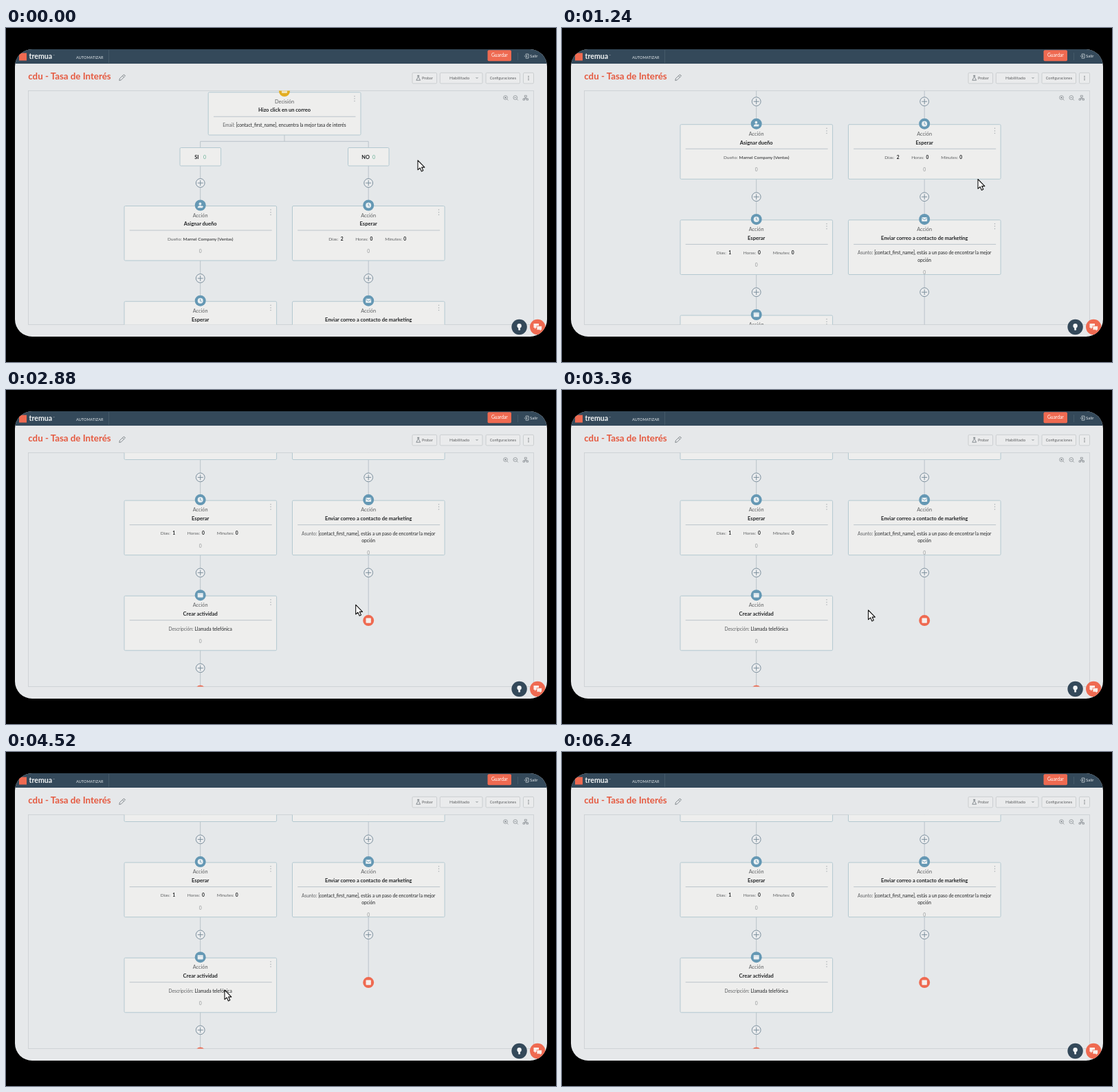
Animation, 800 px wide and 487 px high, one loop 6480 ms. Source, as an HTML page:

```html
<!DOCTYPE html>
<html lang="es">
<head>
<meta charset="utf-8">
<title>Automatizar</title>
<style>
  html, body { margin: 0; width: 100%; height: 100%; overflow: hidden; background: #000; }
  svg { display: block; width: 800px; height: 487px; }
  text { font: 6.65px Lato, sans-serif; fill: #5f6163; white-space: pre; }
  .b { font-weight: 700; }
  .dark { fill: #202224; }
  .line { fill: none; stroke: #b6c0c7; stroke-width: .9; }
  .card { fill: #eeeeed; stroke: #b3c8d0; }
  .icon { fill: none; stroke: #6d7479; stroke-width: .8; }
  .btn { fill: #eaebec; stroke: #c3c7ca; stroke-width: .8; }
  .light { fill: #e9eff2; }
  .mid { text-anchor: middle; }
</style>
</head>
<body>
<svg id="stage" viewBox="0 0 800 487"></svg>
<script>
const LEFT = 282.7, RIGHT = 527.2, LOOP = 6480, STEP = 40;
const BLUE = '#6598b4', RED = '#ef6a51', NAVY = '#34495a';

const text = (x, y, s, size = 6.65, cls = '', fill = '') =>
  `<text x="${x}" y="${y}" class="${cls}" style="font-size:${size}px;${fill && 'fill:' + fill}">${s}</text>`;
const mid = (x, y, s, size, cls = '', fill) => text(x, y, s, size, 'mid ' + cls, fill);
const rect = (x, y, w, h, attrs, r = 1.5) =>
  `<rect x="${x}" y="${y}" width="${w}" height="${h}" rx="${r}" ${attrs}/>`;
const path = (d, attrs = 'class="line"') => `<path d="${d}" ${attrs}/>`;
const circle = (x, y, r, attrs) => `<circle cx="${x}" cy="${y}" r="${r}" ${attrs}/>`;
const at = (x, y, s) => `<g transform="translate(${x} ${y})">${s}</g>`;
const dots = (x, y, gap = 3.6, fill = '#a7adb1') =>
  [-1, 0, 1].map(i => circle(x, y + i * gap, .75, `fill="${fill}"`)).join('');
const pair = (label, value) => `${label} <tspan class="dark">${value}</tspan>`;

const glyphs = {
  person: circle(-.3, -2, 1.9, 'class="light"') + path('M-4 3.8Q-3.8 .6-.3 .6T3.2 3.8Z', 'class="light"') +
    path('M1.3 2H4.4M2.8 .5V3.5', 'stroke="#e9eff2" stroke-width=".8"'),
  clock: circle(0, 0, 4, 'class="light"') + path('M0-2.5V.3L1.8 1.4', `fill="none" stroke="${BLUE}" stroke-width=".9"`),
  mail: rect(-4, -3, 8, 6, 'class="light"', .8) + path('M-4-2.2L0 .8 4-2.2', `fill="none" stroke="${BLUE}" stroke-width=".8"`),
  task: rect(-4, -3.2, 8, 6.4, 'class="light"', .8) + path('M-4-1.8H4', 'stroke="#b9d0dc" stroke-width=".7"'),
  stop: rect(-3.7, -3.7, 7.4, 7.4, 'fill="#f5efed"', 1)
};
const badge = (x, y, kind, fill = BLUE) => at(x, y, circle(0, 0, 8, `fill="${fill}"`) + glyphs[kind]);
const plus = (x, y) => at(x, y, circle(0, 0, 6.4, 'fill="#eaecee" stroke="#7b8e9c"') +
  path('M-4 0H4M0-4V4', 'stroke="#7b8e9c" fill="none"'));

// y is the centre of the badge on the card's top edge
function action(x, y, kind, title, body, zero = 69.5) {
  return rect(x - 110.7, y + 1, 221.6, 79.6, 'class="card"') +
    path(`M${x - 103} ${y + 36.5}h207`) + badge(x, y, kind) + dots(x + 102.3, y + 10.2) +
    mid(x, y + 17, 'Acción', 7.4) + mid(x, y + 29.9, title, 7.5, 'b dark') + body +
    mid(x, y + zero, '0', 6.8, '', '#96999b');
}
const wait = (x, y, days) => [[-58, 'Días:', -40.5, days], [-19, 'Horas:', 2.3, 0], [24, 'Minutes:', 51, 0]]
  .map(([a, label, b, n]) => text(x + a, y + 51.4, label, 6.5) + text(x + b, y + 51.4, n, 6.7, 'b dark')).join('');
const answer = (x, word, gap) => rect(x - 29.7, 174.5, 59.6, 26.5, 'class="card"') +
  text(x - gap, 190.6, word, 7.4, 'b dark') + text(x + gap - 4.2, 190.6, '0', 7, '', '#68b096');

const flow =
  path(`M405 156V165.3M${LEFT} 174V165.3H${RIGHT}V174M${LEFT} 201V676M${RIGHT} 201V574`) +
  rect(294.2, 93.8, 221.8, 62.2, 'class="card"') + path('M302 129.2H508.5') + dots(507, 103) +
  circle(405, 92, 8, 'fill="#e3ad22"') + rect(401, 89, 8, 6, 'fill="#f3e3b5"', 1) +
  mid(405, 109.6, 'Decisión', 7.4) + mid(405, 122.4, 'Hizo click en un correo', 7.5, 'b dark') +
  mid(405, 144.2, pair('Email:', '[contact_first_name], encuentra la mejor tasa de interés')) +
  answer(LEFT, 'SI', 8.4) + answer(RIGHT, 'NO', 10) +
  [226, 365, 504, 643].map(y => plus(LEFT, y)).join('') + [226, 365, 504].map(y => plus(RIGHT, y)).join('') +
  action(LEFT, 258.5, 'person', 'Asignar dueño', mid(LEFT, 309.8, pair('Dueño:', 'Marnel Company (Ventas)'), 6.5)) +
  action(RIGHT, 258.5, 'clock', 'Esperar', wait(RIGHT, 258.5, 2)) +
  action(LEFT, 397.7, 'clock', 'Esperar', wait(LEFT, 397.7, 1)) +
  action(RIGHT, 397.7, 'mail', 'Enviar correo a contacto de marketing',
    mid(RIGHT, 449.2, pair('Asunto:', '[contact_first_name], estás a un paso de encontrar la mejor')) +
    mid(RIGHT, 459.7, 'opción', 6.65, 'dark'), 80) +
  action(LEFT, 536.8, 'task', 'Crear actividad', mid(LEFT, 588.2, pair('Descripción:', 'Llamada telefónica'))) +
  badge(LEFT, 676.2, 'stop', RED) + badge(RIGHT, 573.7, 'stop', RED);

const header = rect(13, 31, 774, 21, `fill="${NAVY}"`, 0) +
  rect(19, 36.5, 11, 11, `fill="${RED}"`, 0) +
  text(33.5, 45.3, 'tremua', 10.6, 'b', '#f2f4f5') + text(68.4, 41, '™', 3, '', '#dfe4e7') +
  text(102, 45.2, 'AUTOMATIZAR', 5.6, '', '#e3e8eb') +
  path('M149.5 32V51M744.5 36V47', 'stroke="#4b5f6e" stroke-width=".8"') +
  rect(700.5, 32.3, 34.5, 16, `fill="${RED}"`, 2) + mid(717.8, 42.4, 'Guardar', 6.7, '', '#fff') +
  path('M756 39.2V38H760V44H756V42.8M753.8 41H758M756.5 39.5L758 41 756.5 42.5', 'fill="none" stroke="#e3e8eb" stroke-width=".7"') +
  text(762, 43.2, 'Salir', 6.1, '', '#e3e8eb');

const toolbar = text(32.3, 75.3, 'cdu - Tasa de Interés', 13.3, 'b', '#e5593f') +
  path('M164.8 76.5L165.4 73.6 170.8 68.4Q172 67.8 172.9 69T172.7 70.6L167.5 75.8ZM169.5 69.8L171.5 71.8', 'class="icon"') +
  rect(591, 65.3, 35.6, 15.6, 'class="btn"') + rect(631.3, 65.3, 61.7, 15.6, 'class="btn"') +
  rect(698, 65.3, 49.5, 15.6, 'class="btn"') + rect(752.5, 65.3, 15, 15.6, 'class="btn"') +
  path('M598.2 69.3H601.2M599 69.3V72.2L596.8 76.2H602.6L600.4 72.2V69.3', 'class="icon"') +
  text(605, 75, 'Probar', 5.4) + text(645, 75.2, 'Habilitado', 6.5) +
  path('M683.5 72L685 73.5 686.5 72', 'class="icon"') +
  text(703.8, 75, 'Configuraciones', 5.4) + dots(760, 73, 2.6, '#666c70');

const lens = (x, sign) => at(x, 101.5, circle(0, 0, 2.9, 'class="icon" opacity=".75"') +
  path(`M2.1 2.1L4 4M-1.5 0H1.5${sign}`, 'class="icon" opacity=".75"'));
const tools = lens(726.5, 'M0-1.5V1.5') + lens(740.8, '') +
  path('M754.3 98.3H757.3V100.8H754.3ZM755.8 100.8V103M753.2 103H758.4M752 103H754.5V105.2H752ZM757 103H759.5V105.2H757Z', 'class="icon" opacity=".75"');

const bubbles = circle(746.6, 436, 11.2, `fill="${NAVY}"`) +
  circle(746.6, 434.2, 3.2, 'fill="#f4f6f7"') + rect(745.2, 436.5, 2.8, 4.2, 'fill="#f4f6f7"', .7) +
  circle(773.2, 436, 11.2, `fill="${RED}"`) +
  path('M767.5 431H775V437H771L769 439V437H767.5Z', 'fill="#fbefeb"') +
  path('M772 434.5H779.5V440.3H778V442.2L776 440.3H772Z', `fill="#fbefeb" stroke="${RED}" stroke-width=".7"`);

document.getElementById('stage').innerHTML =
  `<defs><clipPath id="panel">${rect(13, 31, 774, 419, '', 25)}</clipPath>
   <clipPath id="view">${rect(32.5, 91.5, 735, 341, '', 0)}</clipPath></defs>
   <g clip-path="url(#panel)">${rect(13, 31, 774, 419, 'fill="#e6e8ea"', 0)}${header}${toolbar}
   ${rect(32.5, 91.5, 735, 341, 'fill="#e5e8ea" stroke="#cdd1d4" stroke-width=".9"', 0)}
   <g clip-path="url(#view)"><g id="flow">${flow}</g></g>${tools}${bubbles}
   ${path('M0 0V13.8L3.2 11 5.4 15.9 7.8 14.8 5.6 10.1H9.9Z', 'id="cursor" fill="#fff" stroke="#111" stroke-width="1.1" stroke-linejoin="round"')}</g>`;

// time, x, y of the pointer tip
const track = [[0, 599, 193], [1240, 605, 220.5], [2280, 608, 234.5], [2680, 535, 310], [3360, 445.5, 321],
  [4080, 346, 335], [4520, 318, 347], [4760, 308.5, 349], [5240, 308.5, 349], [5800, 358.5, 307],
  [5920, 335, 328], [6200, 141, 451], [LOOP, 141, 470]];
const ease = k => { k = Math.min(1, Math.max(0, k)); return k * k * (3 - 2 * k); };
const scrollAt = t => 118.8 * (ease((t - 200) / 320) + ease((t - 1560) / 320));
function pointerAt(t) {
  const i = track.findIndex(p => p[0] > t), [t0, x0, y0] = track[i - 1], [t1, x1, y1] = track[i];
  const k = (t - t0) / (t1 - t0);
  return [x0 + (x1 - x0) * k, y0 + (y1 - y0) * k];
}

const flowEl = document.getElementById('flow'), cursorEl = document.getElementById('cursor');
function draw() {
  const t = Math.floor(performance.now() % LOOP / STEP) * STEP;
  flowEl.setAttribute('transform', `translate(0 ${-scrollAt(t)})`);
  cursorEl.setAttribute('transform', `translate(${pointerAt(t)})`);
  requestAnimationFrame(draw);
}
draw();
</script>
</body>
</html>
```
